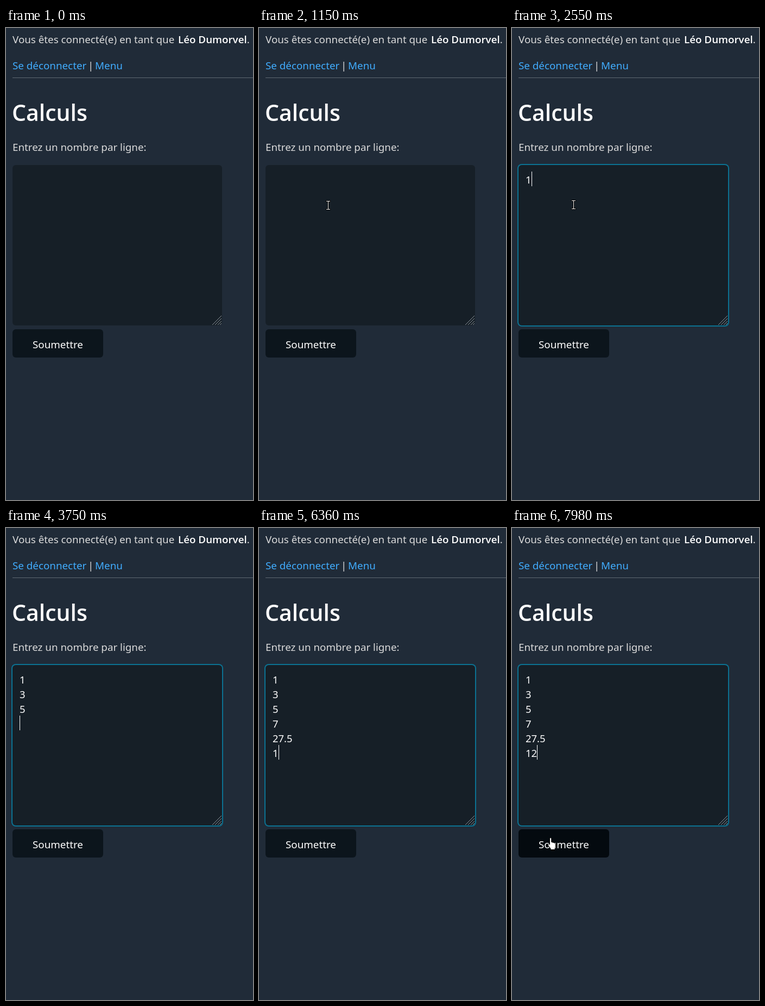
Write an HTML page that moves like this. It is 455 by 868 pixels and loops after 8 s.

```html
<!DOCTYPE html>
<html lang="fr">
<head>
<meta charset="utf-8">
<title>Calculs</title>
<style>
  html, body { margin: 0; height: 100%; overflow: hidden; background: #202b38; }
  svg { display: block; }
  text { font: 18.8px "Noto Sans", "Open Sans", sans-serif; fill: #dbdbdb; }
  .link { fill: #41adff; }
  .bright { fill: #fff; }
  .strong { fill: #fff; font-family: "Open Sans", "Noto Sans", sans-serif; font-weight: 600; }
  .title { font-size: 41px; }
  #lines text { font-size: 18.4px; fill: #fff; }
  #pointer path { fill: #fff; stroke: #000; stroke-linejoin: round; }
  #beam { stroke-width: 2; paint-order: stroke; }
</style>
</head>
<body>
<svg width="455" height="868" viewBox="0 0 455 868">
  <text x="12" y="28">Vous êtes connecté(e) en tant que</text>
  <text x="317" y="28"><tspan class="strong">Léo Dumorvel</tspan>.</text>
  <text x="12" y="76" class="link">Se déconnecter</text>
  <text x="151" y="76">|</text>
  <text x="164" y="76" class="link">Menu</text>
  <rect x="12" y="91" width="443" height="1" fill="#5f6972"/>
  <text x="11" y="171" class="strong title">Calculs</text>
  <text x="12" y="226">Entrez un nombre par ligne:</text>

  <rect id="ring" fill="#0096bf"/>
  <rect x="12" y="252" width="386" height="295" rx="6" fill="#161f27"/>
  <path d="M380 546 397 529M385 546 397 534M390 546 397 539M394 546 397 543" stroke="#8a9299"/>
  <g id="lines"></g>
  <rect id="caret" width="1" height="27" fill="#fff"/>

  <rect id="button" x="12" y="554" width="167" height="52" rx="6"/>
  <text x="49" y="589" class="bright">Soumettre</text>

  <g id="pointer">
    <path id="arrow" d="M.5.5V16.5L4.2 13 6.7 18.7 9.2 17.6 6.8 12H11.8Z"/>
    <path id="beam" d="M-3-8H4V-7H1V7H4V8H-3V7H0V-7H-3Z"/>
    <path id="hand" d="M-1.5 12V1.2a1.6 1.6 0 0 1 3.2 0V7.5L7 8.8q2.3.6 2.3 3v4q0 2-1.2 3.5V21.5H0V19.5L-4.5 13.5q-.9-2.2 .9-2.6Z"/>
  </g>
  <circle id="click" cx="110" cy="298" r="15" fill="#ff0" opacity=".48"/>
</svg>
<script>
const LOOP = 8000, STEP = 66.8, START = 210, CLICK = 1540, BLINK = 530;
const $ = id => document.getElementById(id);
const set = (el, attrs) => { for (const k in attrs) el.setAttribute(k, attrs[k]); };
const show = (el, on) => el.style.display = on ? '' : 'none';
const clamp = v => Math.min(1, Math.max(0, v));

// Each line is typed from its start with an even gap between keys
const typing = [
  { start: 2550, gap: 190, text: '1\n' },
  { start: 3030, gap: 130, text: '3\n' },
  { start: 3490, gap: 190, text: '5\n' },
  { start: 4360, gap: 330, text: '7\n' },
  { start: 5020, gap: 200, text: '27.5\n' },
  { start: 6100, gap: 400, text: '12' }
];
const keys = typing.flatMap(({ start, gap, text }) =>
  [...text].map((char, i) => ({ time: start + i * gap, char })));

// Pointer moves ease out along a line that bows sideways, and rest until hidden
const moves = [
  { start: START, end: 1490, hide: 1890, from: [341, 754], to: [110, 298], power: 2.12, bow: 12 },
  { start: 1890, end: 2090, hide: 2550, from: [110, 298], to: [113, 325], power: 1, bow: 0 },
  { start: 6490, end: 6780, hide: 6905, from: [386, 164], to: [360, 153], power: 2, bow: 0 },
  { start: 7090, end: 7800, hide: LOOP, from: [-7, 464], to: [71, 570], power: 1.7, bow: -8 }
];

const lines = typing.map((_, i) => {
  const el = document.createElementNS('http://www.w3.org/2000/svg', 'text');
  set(el, { x: 25, y: 286 + 27 * i });
  return $('lines').appendChild(el);
});

function pointerAt(t) {
  const m = moves.find(m => t >= m.start && t < m.hide);
  if (!m) return null;
  const f = 1 - (1 - clamp((t - m.start) / (m.end - m.start))) ** m.power;
  const [x, y] = m.from.map((v, n) => v + (m.to[n] - v) * f);
  return [x + m.bow * Math.sin(Math.PI * f), y].map(Math.round);
}

function drawText(t) {
  const typed = keys.filter(k => k.time <= t);
  const rows = typed.map(k => k.char).join('').split('\n');
  lines.forEach((el, i) => el.textContent = rows[i] || '');

  const last = rows.length - 1;
  const width = rows[last] ? lines[last].getComputedTextLength() : 0;
  const idle = t - (typed.length ? typed[typed.length - 1].time : CLICK);
  set($('caret'), { x: Math.round(25 + width), y: 264 + 27 * last });
  show($('caret'), idle >= 0 && idle % (2 * BLINK) < BLINK);
}

function drawPointer(t) {
  const pos = pointerAt(t);
  let kind = '';
  if (pos) {
    const [x, y] = pos;
    const within = (l, top, r, bottom) => x >= l && x < r && y >= top && y < bottom;
    kind = within(12, 252, 398, 547) ? 'beam' : within(12, 554, 179, 606) ? 'hand' : 'arrow';
    set($('pointer'), { transform: `translate(${x} ${y})` });
  }
  for (const k of ['arrow', 'beam', 'hand']) show($(k), k === kind);
  set($('button'), { fill: kind === 'hand' ? '#040a0f' : '#0c151c' });
}

function draw(t) {
  const stepped = START + Math.floor((t - START) / STEP) * STEP;
  const focus = clamp((stepped - 1506) / 100), grow = 2 * focus;
  set($('ring'), { x: 12 - grow, y: 252 - grow, width: 386 + 2 * grow, height: 295 + 2 * grow,
                   rx: 6 + grow, opacity: 0.67 * focus });
  show($('click'), t >= CLICK && t < CLICK + 85);
  drawText(t);
  drawPointer(stepped);
}

function tick() {
  draw(performance.now() % LOOP);
  requestAnimationFrame(tick);
}
tick();
</script>
</body>
</html>
```
